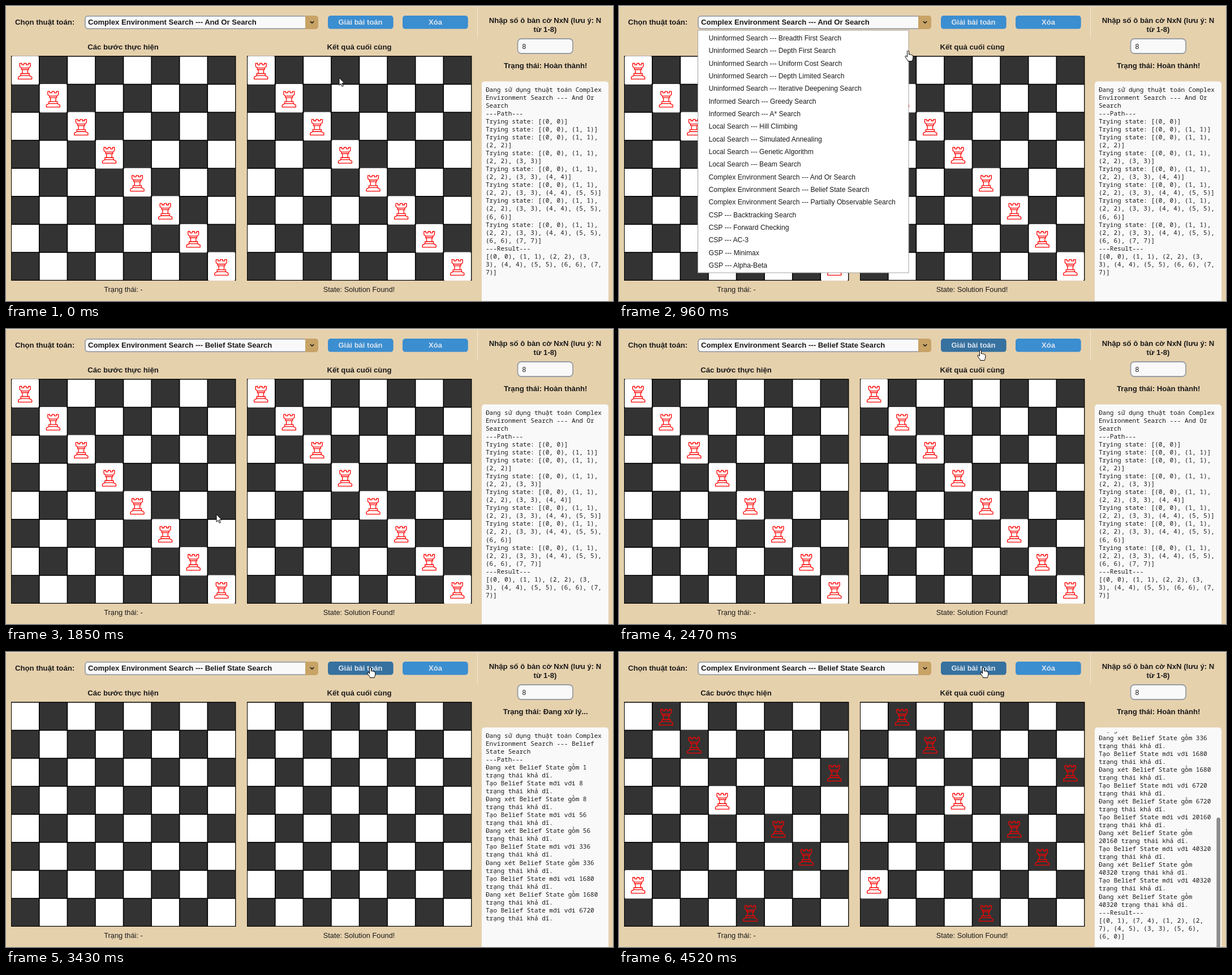
An HTML page that plays this animation: 1073 by 522 pixels, repeating every 6.7 s.

```html
<!DOCTYPE html>
<html lang="vi">
<head>
<meta charset="utf-8">
<title>Rook placement search</title>
<style>
  html, body { margin: 0; width: 100%; height: 100%; overflow: hidden; background: #e6d1ad; }
  svg { display: block; width: 1073px; height: 522px; font: 12.8px "Liberation Sans", Arial, sans-serif; fill: #1a1a1a; }
  text { white-space: pre; }
  .bold { font-weight: bold; font-size: 13.15px; }
  .mid { text-anchor: middle; }
  .small { font-size: 12.14px; }
  .onBlue { fill: #dce4ee; font-size: 13px; }
  .field { fill: #f9f9fa; stroke: #979da2; stroke-width: 1.8; }
  #log { font: 11.03px "Noto Sans Mono", "DejaVu Sans Mono", monospace; }
  .cursor path { fill: #fff; stroke: #000; stroke-width: 1; stroke-linejoin: round; }
</style>
</head>
<body>
<svg viewBox="0 0 1073 522">
  <defs>
    <path id="rook" fill="none" stroke="#f00" stroke-width="1.3" stroke-linejoin="round" d="M15.1 12.6h3.6v2.6h3.7v-2.6h4.2v2.6h3.7v-2.6h3.6v5.6l-3 2.6h-12.8l-3-2.6z
      M18.1 20.8v2.8h12.8v-2.8M19.8 23.6v6.8M29.2 23.6v6.8M17 30.6h15v3.6h-15zM17 34.2l-4.5 2.6v3.6h24v-3.6l-4.5-2.6"/>
    <clipPath id="logClip"><rect x="842" y="141.2" width="222" height="381"/></clipPath>
  </defs>
  <path d="M0 .5H1073M833.5 0V57" stroke="#f1e6d3"/>

  <text class="bold" x="16" y="33">Chọn thuật toán:</text>
  <rect class="field" x="139.9" y="17.9" width="411" height="22.2" rx="5"/>
  <path id="arrowBox" d="M529 17H547a5 5 0 0 1 5 5V36a5 5 0 0 1-5 5H529z"/>
  <path d="M538.2 27.7l2.8 2.4 2.8-2.4" fill="none" stroke="#1a1a1a" stroke-width="1.6" stroke-linecap="round"/>
  <text id="choice" class="bold" x="145" y="33" style="font-size:13.1px"></text>

  <rect id="solve" x="569" y="17" width="115.7" height="23.6" rx="5"/>
  <text class="bold mid onBlue" x="626.5" y="33">Giải bài toán</text>
  <rect x="701" y="17" width="115.7" height="23.6" rx="5" fill="#3b8ed0"/>
  <text class="bold mid onBlue" x="759" y="33">Xóa</text>

  <text class="bold mid" x="207" y="77">Các bước thực hiện</text>
  <text class="bold mid" x="624.5" y="77">Kết quả cuối cùng</text>
  <g id="boards"></g>
  <g id="rooks"></g>
  <text class="mid" x="207.5" y="506">Trạng thái: -</text>
  <text class="mid" x="624" y="506">State: Solution Found!</text>

  <text class="bold mid" x="953" y="30">Nhập số ô bàn cờ NxN (lưu ý: N</text>
  <text class="bold mid" x="953" y="46">từ 1-8)</text>
  <rect class="field" x="904.5" y="58" width="97.5" height="26" rx="6.5"/>
  <text class="small" x="912.5" y="75.8">8</text>
  <text id="status" class="bold mid" x="953.7" y="110"></text>
  <rect x="841" y="133.5" width="224" height="400" rx="5" fill="#f9f9fa"/>
  <g clip-path="url(#logClip)"><g id="log"></g></g>
  <rect id="thumb" x="1056.3" y="293" width="6.6" height="257" rx="3.3" fill="#8c8c8c"/>

  <g id="menu" class="small">
    <rect x="139.5" y="43" width="372.5" height="429" fill="#fff" stroke="#a2a2a2"/>
    <rect id="hover" x="141" width="369.5" height="22.35" fill="#e6cfa6"/>
  </g>
  <g id="cursor" class="cursor">
    <path id="arrow" d="M0 0V13.3L3.1 10.5 5.2 15.4 7.3 14.5 5.2 9.7H9.2z"/>
    <path id="hand" d="M-1.5 1.2Q0-.8 1.5 1.2V7Q3.4 5.6 4.3 7.2 6 6.4 6.8 8 8.6 7.6 8.8 9.4V13Q8.8 15 7.3 17.5V18.5H-.5V17.3Q-3 14.5-5 11-5.5 8.8-3.4 9.3L-1.5 11z"/>
  </g>
</svg>
<script>
const LOOP = 6700, START = 130, TICK = 68.5;
const CELL = 49.58, TOP = 88.9, LEFT = [9.2, 426.2];
const ROW = 22.33, LINE = 14.05;
const $ = id => document.getElementById(id);
const show = (id, on) => { $(id).style.display = on ? '' : 'none'; };
const range = n => [...Array(n).keys()];

// Boards
const shade = (r, c) => (r + c) % 2 ? '#333' : '#fff';
const boardSvg = x => `<rect x="${x - .2}" y="${TOP - .7}" width="397.4" height="397.8" fill="#000"/>` +
  range(64).map(i => {
    const r = i >> 3, c = i & 7;
    return `<rect x="${x + c * CELL + .8}" y="${TOP + r * CELL + .8}" width="48" height="48" fill="${shade(r, c)}"/>`;
  }).join('');
$('boards').innerHTML = LEFT.map(boardSvg).join('');

const rookSvg = (board, [r, c]) =>
  `<g transform="translate(${LEFT[board] + c * CELL} ${TOP + r * CELL})">` +
  `<rect x="1.5" y="-.5" width="46.6" height="50.5" fill="${shade(r, c)}"/><use href="#rook"/></g>`;

const diagonal = range(8).map(i => [i, i]);
const solution = [[0, 1], [7, 4], [1, 2], [2, 7], [4, 5], [3, 3], [5, 6], [6, 0]];
const listText = cells => `[${cells.map(p => `(${p.join(', ')})`).join(', ')}]`;

function leftRooks(n) {
  if (n < 55) return diagonal.slice(Math.max(0, (n - 37) * 4));
  return n === 55 ? [[0, 2], [1, 4]] : solution.slice(0, n - 53);
}
function rightRooks(n) {
  return n < 51 ? diagonal.slice(Math.max(0, (n - 39) * 2)) : solution;
}

// Menu
const groups = {
  'Uninformed Search': ['Breadth First Search', 'Depth First Search', 'Uniform Cost Search',
    'Depth Limited Search', 'Iterative Deepening Search'],
  'Informed Search': ['Greedy Search', 'A* Search'],
  'Local Search': ['Hill Climbing', 'Simulated Annealing', 'Genetic Algorithm', 'Beam Search'],
  'Complex Environment Search': ['And Or Search', 'Belief State Search', 'Partially Observable Search'],
  'CSP': ['Backtracking Search', 'Forward Checking', 'AC-3'],
  'GSP': ['Minimax', 'Alpha-Beta']
};
const items = Object.entries(groups).flatMap(([g, names]) => names.map(s => `${g} --- ${s}`));
$('menu').insertAdjacentHTML('beforeend',
  items.map((s, i) => `<text x="158.5" y="${61.1 + i * ROW}">${s}</text>`).join(''));
const [andOr, belief] = [items[11], items[12]];

// Log
function wrap(paragraphs, width) {
  return paragraphs.flatMap(p => {
    const lines = [];
    let line = '';
    for (const word of p.split(' ')) {
      if (line && line.length + 1 + word.length > width) { lines.push(line); line = word; }
      else line += (line && ' ') + word;
    }
    return [...lines, line];
  });
}
const intro = name => `Đang sử dụng thuật toán ${name}`;
const examine = k => `Đang xét Belief State gồm ${k} trạng thái khả dĩ.`;
const create = k => `Tạo Belief State mới với ${k} trạng thái khả dĩ.`;
const sizes = [8, 56, 336, 1680, 6720, 20160, 40320, 40320];
const firstLog = wrap([intro(andOr), '---Path---',
  ...range(8).map(i => `Trying state: ${listText(diagonal.slice(0, i + 1))}`),
  '---Result---', listText(diagonal)], 31);
const beliefText = [intro(belief), '---Path---', examine(1),
  ...sizes.flatMap(k => [create(k), examine(k)]), '---Result---', listText(solution)];
const growingLog = wrap(beliefText, 31), finalLog = wrap(beliefText, 30);

function logLines(n) {
  if (n < 39) return firstLog;
  if (n >= 52) return finalLog;
  return growingLog.slice(0, n < 46 ? 3 : n < 47 ? 12 : n < 48 ? 18 : 24);
}

// Pointer: tick, x, y
const path = [[-1, 589, 127], [6, 546, 28], [10, 545, 24], [12, 511, 79], [18, 374, 317], [19, 372, 322],
  [20, 372, 328], [26, 372, 328], [32, 629, 56], [33, 634, 47], [35, 644, 27]];
function pointer(n) {
  const i = path.findIndex(p => p[0] >= n);
  if (i < 0) return path[path.length - 1].slice(1);
  if (i === 0) return path[0].slice(1);
  const a = path[i - 1], b = path[i], k = (n - a[0]) / (b[0] - a[0]);
  return [a[1] + (b[1] - a[1]) * k, a[2] + (b[2] - a[2]) * k];
}

function draw(n) {
  const [x, y] = pointer(n);
  const hand = n >= 6 && n <= 12 || n >= 34;
  $('cursor').setAttribute('transform', `translate(${x} ${y})`);
  show('hand', hand);
  show('arrow', !hand);

  const row = Math.floor((y - 45.6) / ROW);
  show('menu', n >= 8 && n < 23);
  show('hover', n > 12 && row >= 0);
  $('hover').setAttribute('y', 45.4 + row * ROW);
  $('choice').textContent = n < 23 ? andOr : belief;
  $('arrowBox').setAttribute('fill', n >= 6 && n < 11 ? '#b08b4f' : '#c8a366');
  $('solve').setAttribute('fill', n >= 34 && n < 38 || n >= 46 ? '#36719f' : '#3b8ed0');

  $('rooks').innerHTML = leftRooks(n).map(p => rookSvg(0, p)).join('') +
    rightRooks(n).map(p => rookSvg(1, p)).join('');
  $('status').textContent = 'Trạng thái: ' + (n >= 38 && n < 64 ? 'Đang xử lý...' : 'Hoàn thành!');

  const scrolled = n >= 52;
  show('thumb', scrolled);
  $('log').setAttribute('transform', `translate(0 ${scrolled ? -221 : 0})`);
  $('log').innerHTML = logLines(n).map((s, i) => `<text x="848" y="${151.7 + i * LINE}">${s}</text>`).join('');
}

let last;
function frame() {
  const n = Math.max(-1, Math.floor((performance.now() % LOOP - START) / TICK));
  if (n !== last) draw(last = n);
  requestAnimationFrame(frame);
}
frame();
</script>
</body>
</html>
```
